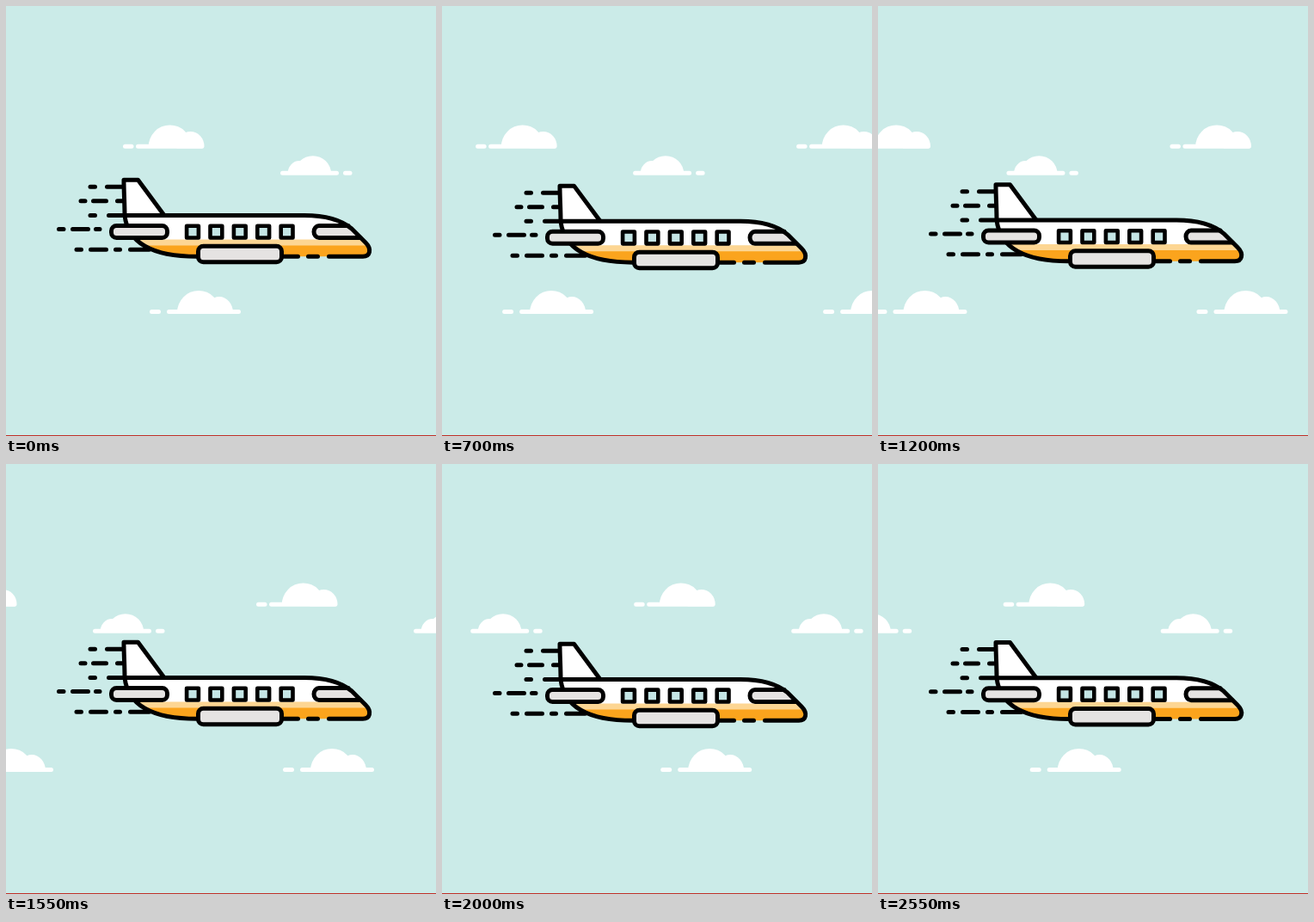
Recreate the animation shown at these times as an HTML page. Size 500x500 px, loop 2.6 s.

```html
<!DOCTYPE html>
<html lang="en">
<head>
<meta charset="utf-8">
<title>Plane</title>
<style>
  html, body { margin: 0; height: 100%; overflow: hidden; background: #cbebe8; }
  svg { display: block; width: 100vw; height: 100vh; }
  .puff { fill: #fff; }
  .base { fill: none; stroke: #fff; stroke-width: 5; stroke-linecap: round; }
  #plane { fill: none; stroke: #000; stroke-width: 5; stroke-linecap: round; stroke-linejoin: round; }
  #plane .grey { fill: #e5e3e2; }
  #plane .flat { stroke: none; }
</style>
</head>
<body>
<svg viewBox="0 0 500 500">
  <defs>
    <clipPath id="hull">
      <path d="M138 243.5H347C372 243.5 390 249 402 259L418 275C426 283 423 291.3 415 291.3H222C175 291.3 142 278 138 243.5Z"/>
    </clipPath>
    <g id="clouds">
      <path class="puff" d="M165.6 164a25 25.6 0 0 1 50 0ZM198.5 165.5V163a16 17 0 0 1 32 0q0 2.500-2.500 2.500Z"/>
      <path class="base" d="M138.5 163.2h7.500M153.500 163.2h74"/>
      <path class="puff" d="M199 356.5a25 25.6 0 0 1 50 0ZM232 356.500a16 18.500 0 0 1 32 0Z"/>
      <path class="base" d="M169.500 355.600h8M189.500 355.600h81"/>
      <path class="puff" d="M335.500 195a21.300 20.800 0 0 1 42.600 0ZM327.500 195a13.500 15 0 0 1 27 0Z"/>
      <path class="base" d="M321.500 194.200h63M394.500 194.200h5.500"/>
    </g>
  </defs>
  <g id="sky">
    <use href="#clouds"/>
    <use href="#clouds" x="373"/>
  </g>
  <g id="plane">
    <path d="M138 243.5C138 230 137 215 137 202.3H153.5L184 243.5" fill="#fff"/>
    <g class="flat" clip-path="url(#hull)">
      <path fill="#fff" d="M130 240h300v32H130z"/>
      <path fill="#fdd693" d="M130 271.5h300v8H130z"/>
      <path fill="#fba41d" d="M130 278.5h300v15H130z"/>
    </g>
    <path class="grey" d="M398 255.5H364a6 7 0 0 0 0 14H412"/>
    <path d="M119.5 243.5H347C372 243.5 390 249 402 259L418 275C426 283 423 291.3 415 291.3H375.5M362.500 291.300H351.500M339.500 291.300H320M222 291.300C175 291.300 142 278 138 243.500"/>
    <path d="M98 210.3h5.500M117.500 210.300h17.500M87 226.800h5M101.500 226.800h15M129.500 226.800h6.500M98 243.500h5.500M61.500 259.500h5.500M77.500 259.500h18M104.500 259.500h4.500M82 283.300h5.500M98.500 283.300h18M127.500 283.300h5M144.500 283.300h22"/>
    <rect class="grey" x="122.500" y="255.500" width="65" height="14" rx="6"/>
    <rect class="grey" x="223.500" y="279.300" width="97" height="18.500" rx="6"/>
    <g id="windows" fill="#c4e5e5" stroke-width="4.600"></g>
  </g>
  <path d="M0 499h500v1H0z" fill="#c03028"/>
</svg>
<script>
  const LOOP = 2600, STEP = 50, SPACING = 373;
  const $ = id => document.getElementById(id);

  $('windows').innerHTML = Array.from({ length: 5 }, (_, i) =>
    `<rect x="${210.1 + i * 27.4}" y="255.7" width="13.8" height="13.8"/>`).join('');

  // Turbulence: [step, vertical offset]
  const bob = [[0, 0], [9, 8], [18, 6], [31, 5], [36, 7.6], [45, 6], [51, 5.2]];

  function bobAt(step) {
    const i = Math.max(1, bob.findIndex(([s]) => s >= step));
    const [s0, y0] = bob[i - 1], [s1, y1] = bob[i];
    const ease = (1 - Math.cos(Math.PI * (step - s0) / (s1 - s0))) / 2;
    return y0 + (y1 - y0) * ease;
  }

  function draw(now) {
    const step = Math.floor(now % LOOP / STEP);
    const drift = Math.max(0, Math.floor(step * 1.5) - 1) * SPACING / 77;
    $('sky').setAttribute('transform', `translate(${-drift} 0)`);
    $('plane').setAttribute('transform', `translate(0 ${bobAt(step)})`);
    requestAnimationFrame(draw);
  }
  draw(0);
</script>
</body>
</html>
```
